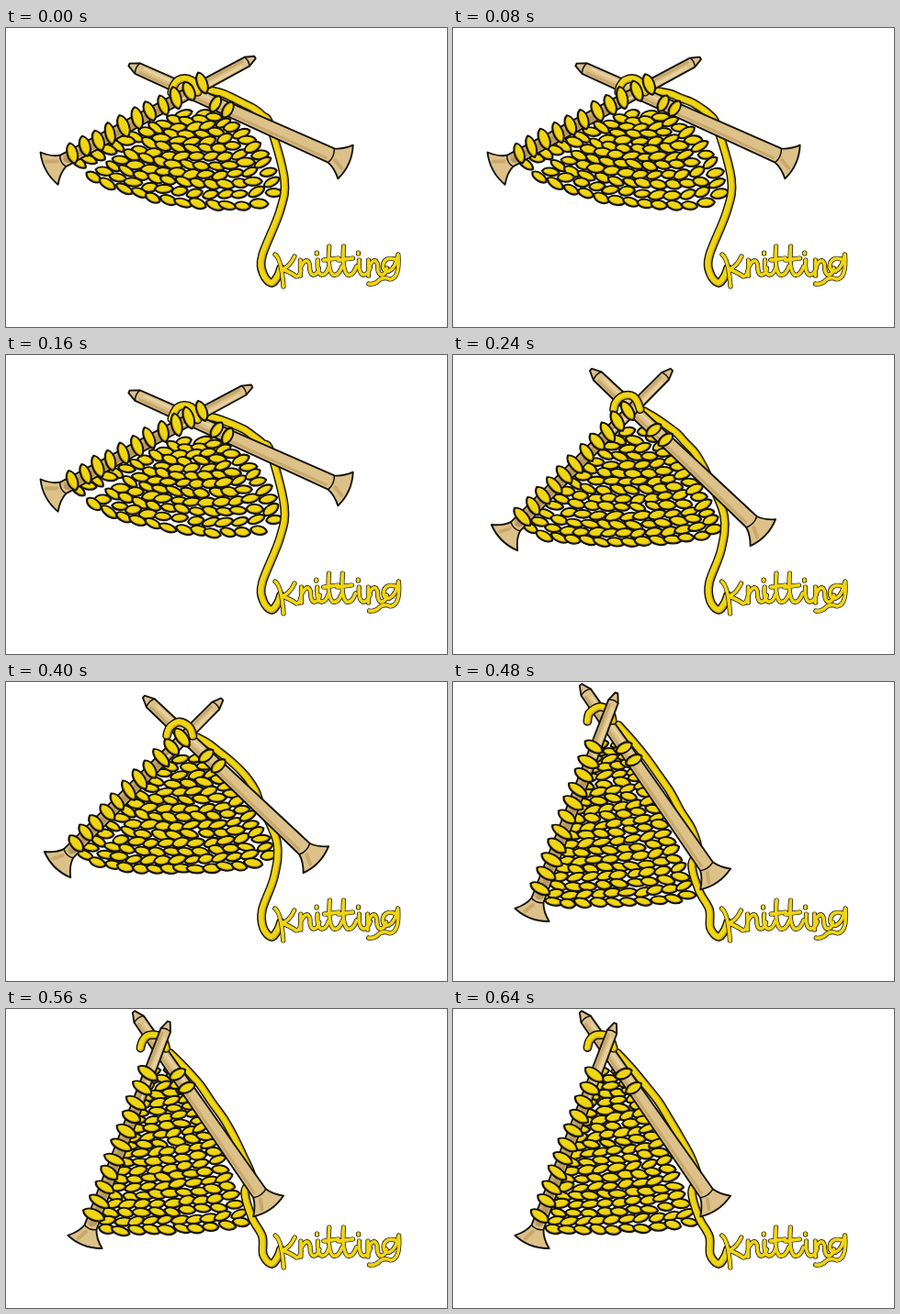
Recreate the animation shown at these times as an HTML page. Size 480x326 px, loop 720 ms.

```html
<!DOCTYPE html>
<html lang="en">
<head>
<meta charset="utf-8">
<title>Knitting</title>
<style>
html, body { margin: 0; width: 100%; height: 100%; overflow: hidden; background: #fff; }
svg { display: block; width: 100%; height: 100%; }
</style>
</head>
<body>
<svg id="stage" viewBox="0 0 480 326" role="img" aria-label="Knitting"></svg>
<script>
const INK = '#15120a', GOLD = '#cdac0c', YELLOW = '#efd614';
const WOOD = '#dcc189', GRAIN = '#c8a86c', PALE = '#e8d3a0', SHADE = '#b6975f';
const STEP = 80, TAKES = 3, LOOPS = 11;

// Needles run from tip to neck. `corner` and `hem` end the fabric,
// `tuck` is where the wool slips under the right needle.
const poses = [
  { left: [[271, 32], [62, 145]], right: [[134, 40], [354, 139]],
    corner: [291, 180], hem: 189, tuck: .56, slack: [[303, 165], [298, 200]] },
  { left: [[238, 16], [68, 187]], right: [[150, 16], [325, 182]],
    corner: [285, 189], hem: 204, tuck: .62, slack: [[295, 175], [292, 212]] },
  { left: [[178, 12], [92, 238]], right: [[139, 3], [276, 201]],
    corner: [256, 233], hem: 240, tuck: .9, slack: [[260, 200], [268, 228]], leftOnTop: true }
];
const tail = [[279, 248], [280, 268], [289, 278], [296, 270], [299, 262]];

function random(seed) {
  let s = seed * 7919 + 17;
  return () => {
    s = (s * 16807) % 2147483647;
    return s / 2147483647 * 2 - 1;
  };
}

const mix = (a, b, t) => a + (b - a) * t;
const mixPt = (p, q, t) => [mix(p[0], q[0], t), mix(p[1], q[1], t)];
const add = (p, x, y) => [p[0] + x, p[1] + y];
const bend = (a, b, c, t) => mixPt(mixPt(a, b, t), mixPt(b, c, t), t);
const angle = (p, q) => Math.atan2(q[1] - p[1], q[0] - p[0]);
const degrees = a => a * 180 / Math.PI;
const series = (n, f) => Array.from({ length: n }, (_, i) => f(i / (n - 1), i));
const num = v => v.toFixed(1);
const pt = p => p.map(num).join(' ');

function crossing([a, b], [c, d]) {
  const ux = b[0] - a[0], uy = b[1] - a[1], vx = d[0] - c[0], vy = d[1] - c[1];
  const t = ((c[0] - a[0]) * vy - (c[1] - a[1]) * vx) / (ux * vy - uy * vx);
  return mixPt(a, b, t);
}

// Smooth curve through points.
function smooth(p) {
  let d = 'M' + pt(p[0]);
  for (let i = 0; i < p.length - 1; i++) {
    const a = p[i - 1] || p[i], b = p[i], c = p[i + 1], e = p[i + 2] || c;
    const h1 = add(b, (c[0] - a[0]) / 6, (c[1] - a[1]) / 6);
    const h2 = add(c, (b[0] - e[0]) / 6, (b[1] - e[1]) / 6);
    d += `C${pt(h1)} ${pt(h2)} ${pt(c)}`;
  }
  return d;
}

const line = (d, color, width, extra = '') =>
  `<path d="${d}" fill="none" stroke="${color}" stroke-width="${width}" ${extra}/>`;

const strand = (d, w) => line(d, INK, w + 2.8) + line(d, GOLD, w) +
  line(d, YELLOW, w * .72, 'transform="translate(-.6 -.4)"');

const lens = (a, b) => `M${num(-a)} 0C${pt([-a * .6, -b * 1.4])} ${pt([a * .7, -b * 1.3])} ${num(a)} 0` +
  `C${pt([a * .6, b * 1.4])} ${pt([-a * .7, b * 1.3])} ${num(-a)} 0Z`;

const stitch = ([x, y], a, b, turn) =>
  `<g transform="translate(${num(x)} ${num(y)}) rotate(${num(turn)})">` +
  `<path d="${lens(a, b)}" fill="${GOLD}" stroke="${INK}" stroke-width="2.1"/>` +
  `<path d="${lens(a - 2, b - 1.5)}" fill="${YELLOW}" transform="translate(-.5 -.5)"/></g>`;

function needle([tip, neck], thin, wide, shaft) {
  const len = Math.hypot(neck[0] - tip[0], neck[1] - tip[1]), a = angle(tip, neck);
  const at = (s, n) => pt(add(tip, Math.cos(a) * s - Math.sin(a) * n, Math.sin(a) * s + Math.cos(a) * n));
  const end = len + 17;
  const body = `M${at(0, 1.5)}L${at(10, thin)}L${at(len, wide)}Q${at(len + 9, wide + 3)} ${at(end, 20)}` +
    `Q${at(end + 8, 0)} ${at(end, -20)}Q${at(len + 9, -wide - 3)} ${at(len, -wide)}L${at(10, -thin)}L${at(0, -1.5)}Z`;
  return `<path d="${body}" fill="${WOOD}"/>` +
    line(`M${at(len * .35, 0)}L${at(len - 6, 0)}`, shaft, wide * 1.4) +
    line(`M${at(14, thin * .5)}L${at(len - 4, wide * .55)}`, GRAIN, 3) +
    line(`M${at(18, -thin * .4)}L${at(len * .4, -thin * .4)}`, PALE, 2.5) +
    line(`M${at(len + 6, 3)}L${at(end - 1, 8)}`, GRAIN, 4) +
    line(body, INK, 1.9) +
    line(`M${at(10, thin)}Q${at(7, 0)} ${at(10, -thin)}M${at(len, wide)}Q${at(len + 4, 0)} ${at(len, -wide)}`, INK, 1.5);
}

// Rows hang between the left needle and the bowed right edge, sagging more towards the hem.
function fabric(pose, cross, rnd) {
  const { corner, hem } = pose, foot = add(pose.left[1], 17, 2);
  const bow = add(mixPt(cross, pose.right[1], .55), -6, 6);
  const drop = hem - (foot[1] + corner[1]) / 2;
  const rows = Math.round((corner[1] - cross[1]) / 9.4);
  return series(rows, (t, r) => {
    const a = mixPt(add(cross, -7, 25), foot, t);
    const b = bend(add(cross, 14, 24), bow, corner, t);
    const place = u => add(mixPt(a, b, u), 0, drop * t * Math.sqrt(Math.max(0, 4 * u * (1 - u))));
    const n = Math.max(2, Math.round((b[0] - a[0]) / 16) + 1);
    return series(n, u => {
      const slope = degrees(angle(place(u - .04), place(u + .04)));
      const turn = slope * .8 + (r % 2 ? 13 : -10) + rnd() * 9;
      return stitch(add(place(u), rnd() * 1.5, rnd()), 9.5 + rnd() * .9, 4.5 + rnd() * .5, turn);
    }).join('');
  }).join('');
}

function castOn([tip, neck], rnd) {
  const turn = degrees(angle(neck, tip)) + 100;
  return series(LOOPS, t => stitch(add(mixPt(neck, tip, mix(.05, .73, t)), rnd() - 1, rnd() - 2),
    11.8 + rnd(), 5.3 + rnd() * .4, turn + rnd() * 7)).join('');
}

function wool(pose, cross, rnd) {
  const neck = pose.right[1], a = angle(cross, neck);
  const along = series(8, s => {
    const out = 14 * Math.sqrt(Math.sin(Math.PI * mix(.1, .99, s))) + rnd();
    return add(mixPt(cross, neck, mix(.06, pose.tuck, s)), Math.sin(a) * out, -Math.cos(a) * out);
  });
  return strand(smooth([...along, ...pose.slack, ...tail]), 7);
}

const glyph = {
  K: x => `M${x} 247q7 5 9 35M${x + 21} 249q-5 11 -13 14q10 4 15 8q4 0 5 -7`,
  n: x => `M${x} 253v17m0 -9q7 -13 10 -3q0 12 5 11q4 -1 5 -7`,
  i: x => `M${x} 253q-1 14 4 16q5 1 8 -8M${x - 1} 245v1`,
  t: x => `M${x} 238q-2 26 4 31q6 2 10 -9M${x - 6} 253l16 -2`,
  g: x => `M${x + 11} 252c-16 -5 -15 17 -6 13q7 -3 10 -18q2 26 -9 27q-8 -4 -14 3q-5 3 -9 2`
};

function lettering(rnd) {
  const starts = [293, 321, 339, 352, 367, 384, 394, 412];
  const d = [...'Knitting'].map((c, i) => glyph[c](starts[i] + rnd() * .6)).join('');
  return line(d, INK, 5.2) + line(d, GOLD, 3.8) + line(d, YELLOW, 3);
}

function drawing(pose, take, seed) {
  const rnd = random(seed + 1), cross = crossing(pose.left, pose.right);
  const [tip, neck] = pose.left;
  const front = needle([mixPt(tip, neck, .008 * take), neck], 5.6, 7, SHADE);
  const hump = strand(smooth(series(7, t => {
    const a = Math.PI * (1 + t);
    return add(cross, 14 * Math.cos(a) - 6 + rnd() * .6, 15 * Math.sin(a) + rnd() * .6);
  })), 7);
  const lean = degrees(angle(cross, pose.right[1])) + 98;
  const worked = [.18, .27].map(t =>
    stitch(add(mixPt(cross, pose.right[1], t), rnd(), rnd()), 9.8, 5, lean + rnd() * 5)).join('');
  return fabric(pose, cross, rnd) + wool(pose, cross, rnd) +
    needle(pose.right, 6.3, 8.3, WOOD) + worked +
    (pose.leftOnTop ? hump + front : front + hump) +
    castOn(pose.left, rnd) + lettering(rnd);
}

const stage = document.getElementById('stage');
const total = poses.length * TAKES;
const markup = series(total, (_, i) =>
  `<g visibility="hidden">${drawing(poses[Math.floor(i / TAKES)], i % TAKES, i)}</g>`).join('');
stage.innerHTML = `<g stroke-linecap="round" stroke-linejoin="round">${markup}</g>`;
const views = [...stage.firstChild.children];

function render(ms) {
  const now = Math.floor(ms / STEP) % total;
  views.forEach((g, i) => g.setAttribute('visibility', i === now ? 'visible' : 'hidden'));
}

let start;
function tick(time) {
  start ??= time;
  render(time - start);
  requestAnimationFrame(tick);
}
render(0);
requestAnimationFrame(tick);
</script>
</body>
</html>
```
